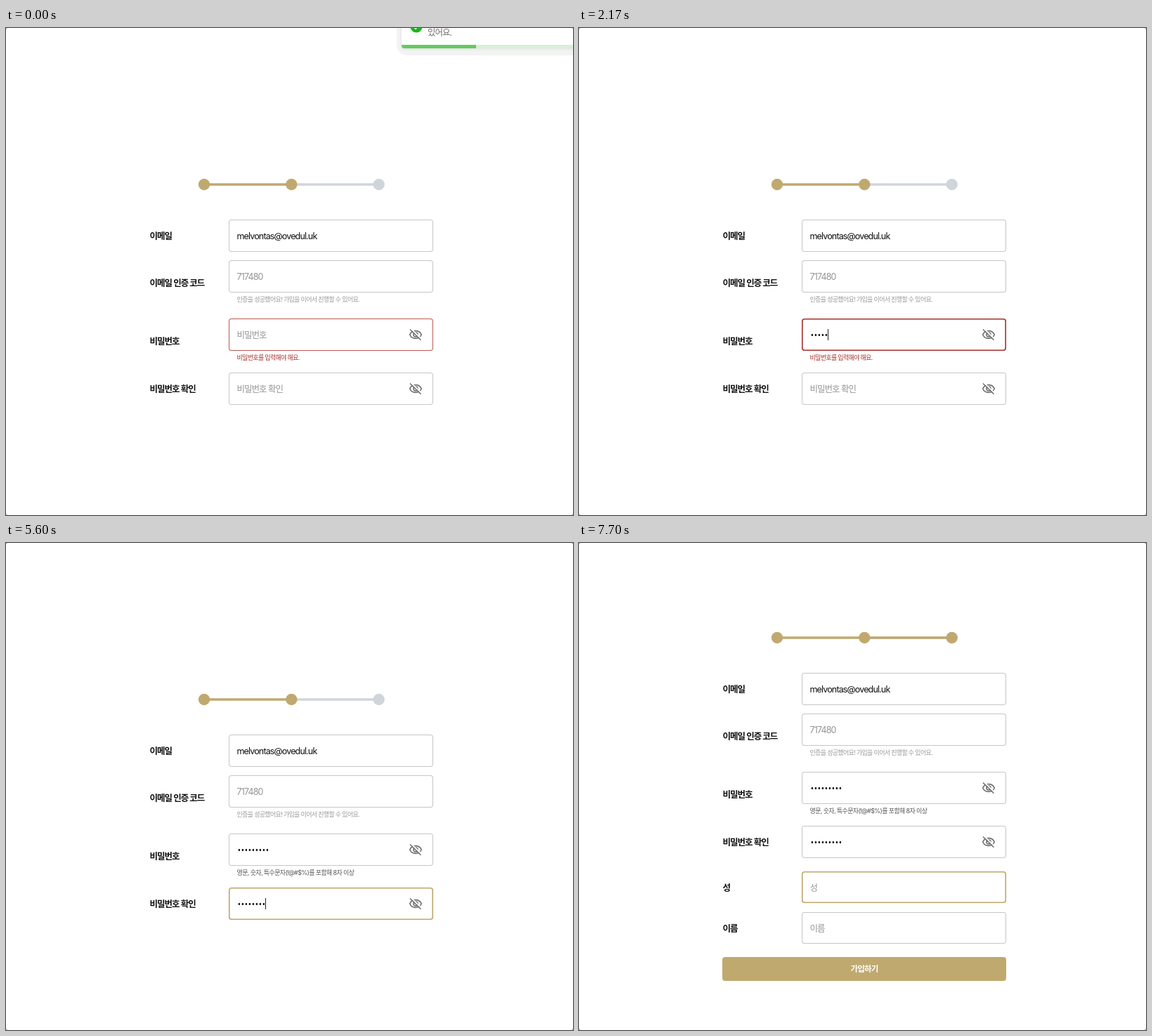
Recreate the animation shown at these times as an HTML page. Size 807x694 px, loop 8 s.

```html
<!DOCTYPE html>
<html lang="ko">
<head>
<meta charset="utf-8">
<title>Sign-up form</title>
<style>
:root {
  --gold: #c0a96f;
  --grey: #c6c6c6;
  --red: #a5302c;
}
html, body { margin: 0; width: 100%; height: 100%; overflow: hidden; background: #999; }
body {
  font: 12.5px/20px Inter, "Noto Sans CJK KR", "Noto Sans CJK JP", sans-serif;
  letter-spacing: -1px;
  white-space: nowrap;
  color: #111;
}
#stage { position: absolute; width: 807px; height: 694px; overflow: hidden; background: #fff; border-radius: 3px; }
#stage div, #stage svg, #stage span, #stage b { position: absolute; }

/* The loop lasts 8 s, so 1% is 80 ms. */
.cut { animation: 8s step-end infinite; }

/* Form */
#form { inset: 0; animation-name: lift; }
@keyframes lift { 0% { transform: none } 77.85%, 100% { transform: translateY(-88px) } }

#steps { left: 0; top: 203px; }
.late { animation-name: late; }
@keyframes late { 0% { opacity: 0 } 77.85%, 100% { opacity: 1 } }

.row { left: 0; width: 807px; height: 45.5px; }
.row b { left: 204.5px; top: 14px; font-weight: 600; }
.noted b { top: 23px; }
.field {
  left: 317px; width: 291px; height: 45.5px;
  border-radius: 4px;
  box-shadow: inset 0 0 0 1px var(--grey);
}
.field span { left: 11.5px; top: 14px; }
.field .latin { letter-spacing: -.85px; }
.hint { color: #949494; }
.note { left: 328.5px; top: 48.5px; font-size: 9px; line-height: 14px; letter-spacing: -.68px; color: #999; }
.eye { left: 256px; top: 13px; width: 20px; height: 20px; fill: none; stroke: #707070; stroke-width: 1.6; }

/* Password bullets, one per 5 px of width; the right border is the caret */
.typed {
  left: 11.5px; top: 15px; height: 16px; width: 0;
  border-right: 1px solid transparent;
  background: radial-gradient(circle at 2.9px 8.5px, #1a1a1a 1.1px, transparent 1.7px) 0 0 / 5px 16px padding-box;
}

#pw .field { animation-name: pwBorder; }
@keyframes pwBorder {
  0% { box-shadow: inset 0 0 0 1px #bb5753 }
  13.1% { box-shadow: inset 0 0 0 1.6px var(--red) }
  45.5%, 100% { box-shadow: inset 0 0 0 1px var(--grey) }
}
#pw .hint { animation-name: pwHint; }
@keyframes pwHint { 0% { opacity: 1 } 20.1%, 100% { opacity: 0 } }
#pw .typed { animation-name: pwType, pwCaret; }
@keyframes pwType {
  0% { width: 0 }
  20.1% { width: 5px }
  21.5% { width: 10px }
  23.6% { width: 15px }
  25.35% { width: 20px }
  27.1% { width: 25px }
  28.85% { width: 30px }
  30.6% { width: 35px }
  34.1% { width: 40px }
  39.35%, 100% { width: 45px }
}
@keyframes pwCaret {
  0% { border-color: transparent }
  13.1% { border-color: #222 }
  45.5%, 100% { border-color: transparent }
}
#pw .error { color: var(--red); animation-name: errorOut; }
@keyframes errorOut { 0% { opacity: 1 } 45.5%, 100% { opacity: 0 } }
#pw .rule { color: #555; letter-spacing: -.63px; animation-name: ruleIn; }
@keyframes ruleIn { 0% { opacity: 0 } 45.5%, 100% { opacity: 1 } }

#again .field { animation-name: againBorder; }
@keyframes againBorder {
  0% { box-shadow: inset 0 0 0 1px var(--grey) }
  45.5% { box-shadow: inset 0 0 0 1.6px var(--gold), 0 0 2px #c0a96f40 }
  77.85%, 100% { box-shadow: inset 0 0 0 1px var(--grey) }
}
#again .hint { animation-name: againHint; }
@keyframes againHint { 0% { opacity: 1 } 53.35%, 100% { opacity: 0 } }
#again .typed { animation-name: againType, againCaret; }
@keyframes againType {
  0% { width: 0 }
  53.35% { width: 5px }
  55.95% { width: 10px }
  57.7% { width: 15px }
  60.35% { width: 20px }
  62.95% { width: 25px }
  65.6% { width: 30px }
  68.2% { width: 35px }
  69.95% { width: 40px }
  76.95%, 100% { width: 45px }
}
@keyframes againCaret {
  0% { border-color: transparent }
  45.5% { border-color: #222 }
  77.85%, 100% { border-color: transparent }
}

/* Name rows glide in from the left */
#family, #given { animation: 8s cubic-bezier(.16, 1, .3, 1) infinite; }
#family { animation-name: familyIn; }
#given { animation-name: givenIn; }
@keyframes familyIn {
  0%, 77.85% { opacity: 0; transform: translateX(-60px) }
  86.6%, 100% { opacity: 1; transform: none }
}
@keyframes givenIn {
  0%, 79.7% { opacity: 0; transform: translateX(-60px) }
  87.5%, 100% { opacity: 1; transform: none }
}
#family .field { box-shadow: inset 0 0 0 1.6px var(--gold), 0 0 2px #c0a96f40; }
#given .field { animation: givenBorder 8s linear infinite; }
@keyframes givenBorder {
  0%, 79.7% { box-shadow: inset 0 0 0 1px #333 }
  82.25% { box-shadow: inset 0 0 0 1px #58585c }
  87%, 100% { box-shadow: inset 0 0 0 1px var(--grey) }
}
#family .typed { animation-name: blink; }
@keyframes blink {
  0% { border-color: #222 }
  83.1% { border-color: transparent }
  89.2% { border-color: #222 }
  96.2%, 100% { border-color: transparent }
}
#join {
  left: 204px; top: 678px; width: 404px; height: 34px;
  border-radius: 4px; background: var(--gold); color: #fff;
  font-size: 11.5px; font-weight: 600; line-height: 35px; letter-spacing: -.8px; text-align: center;
}

/* Toast */
#toast { left: 556px; top: -60px; width: 290px; height: 99px; border-radius: 15px; background: #f3f3f3; animation: leave 8s linear infinite; }
@keyframes leave {
  0%, 23.4% { transform: none }
  25.15% { transform: translateX(-20px) }
  26.2%, 100% { transform: translateX(290px) }
}
#card { left: 7px; top: 0; width: 262px; height: 88.5px; border-radius: 4px; overflow: hidden; background: #fff; }
#shade { left: 7px; top: 0; width: 262px; height: 88.5px; border-radius: 4px; box-shadow: 0 1px 4px #00000014; }
#card span { left: 37px; top: 57px; color: #707070; }
#card svg { left: 12px; top: 49px; }
#bar { left: 0; bottom: 0; width: 100%; height: 4.5px; background: #d9efd6; }
#left { left: 0; top: 0; height: 100%; background: #62cb5f; animation: drain 8s linear infinite; }
@keyframes drain { 0%, 13.1% { width: 106px } 23.4%, 100% { width: 0 } }

/* Pointer: a window over a two-shape sprite, hot spot at 10,10 */
#pointer { left: -10px; top: -10px; width: 24px; height: 32px; overflow: hidden; animation: glide 8s linear infinite, show 8s step-end infinite; }
@keyframes glide {
  0%, 6.1% { transform: translate(432px, 594px) }
  11.4%, 41.1% { transform: translate(420px, 445px) }
  43.75% { transform: translate(424px, 578px) }
  45%, 100% { transform: translate(420px, 526px) }
}
@keyframes show {
  0% { opacity: 0 }
  6.1% { opacity: 1 }
  20.1% { opacity: 0 }
  41.1% { opacity: 1 }
  52.45%, 100% { opacity: 0 }
}
#sprite { left: 0; top: 0; animation-name: shape; }
@keyframes shape {
  0%, 9.75%, 41.4%, 42.9% { transform: translateX(-24px) }
  8.15%, 10.9%, 42%, 44.75%, 100% { transform: none }
}
</style>
</head>
<body>
<svg width="0" height="0" style="position:absolute">
  <symbol id="eye" viewBox="-10 -10 20 20">
    <path d="M-8.3 0C-5.2-7.2 5.2-7.2 8.3 0C5.2 7.2-5.2 7.2-8.3 0Z"/>
    <circle r="3"/>
    <path d="M-6.9-8.6L8.6 6.4" stroke="#fff" stroke-width="1.8"/>
    <path d="M-8-7.5L7.5 7.7"/>
  </symbol>
</svg>
<div id="stage">
  <div id="form" class="cut">
    <svg id="steps" width="807" height="40" stroke-width="3.5">
      <path d="M282 20H406" stroke="#c0a96f"/>
      <path d="M406 20H531" stroke="#d0d5db"/>
      <circle cx="530.7" cy="20" r="8.2" fill="#d0d5db" stroke="none"/>
      <g class="cut late">
        <path d="M406 20H531" stroke="#c0a96f"/>
        <circle cx="530.7" cy="20" r="8.2" fill="#c0a96f" stroke="none"/>
      </g>
      <circle cx="282" cy="20" r="8.2" fill="#c0a96f"/>
      <circle cx="406.3" cy="20" r="8.2" fill="#c0a96f"/>
    </svg>

    <div class="row" style="top:273px">
      <b>이메일</b>
      <div class="field"><span class="latin">melvontas@ovedul.uk</span></div>
    </div>
    <div class="row noted" style="top:331px">
      <b>이메일 인증 코드</b>
      <div class="field"><span class="hint latin">717480</span></div>
      <span class="note">인증을 성공했어요! 가입을 이어서 진행할 수 있어요.</span>
    </div>
    <div class="row noted" id="pw" style="top:414px">
      <b>비밀번호</b>
      <div class="field cut">
        <span class="hint cut">비밀번호</span>
        <div class="typed cut"></div>
        <svg class="eye"><use href="#eye"/></svg>
      </div>
      <span class="note error cut">비밀번호를 입력해야 해요.</span>
      <span class="note rule cut">영문, 숫자, 특수문자(!@#$%)를 포함해 8자 이상</span>
    </div>
    <div class="row" id="again" style="top:491px">
      <b>비밀번호 확인</b>
      <div class="field cut">
        <span class="hint cut">비밀번호 확인</span>
        <div class="typed cut"></div>
        <svg class="eye"><use href="#eye"/></svg>
      </div>
    </div>
    <div class="row" id="family" style="top:555.5px">
      <b>성</b>
      <div class="field"><span class="hint">성</span><div class="typed cut"></div></div>
    </div>
    <div class="row" id="given" style="top:613.5px">
      <b>이름</b>
      <div class="field"><span class="hint">이름</span></div>
    </div>
    <div id="join" class="cut late">가입하기</div>
  </div>

  <div id="toast">
    <div id="shade"></div>
    <div id="card">
      <svg width="18" height="18">
        <circle cx="9" cy="9" r="8.6" fill="#14b81a"/>
        <path d="M5 9.2l3 3 5-6" fill="none" stroke="#fff" stroke-width="1.8"/>
      </svg>
      <span>있어요.</span>
      <div id="bar"><div id="left"></div></div>
    </div>
  </div>

  <div id="pointer">
    <svg id="sprite" class="cut" width="48" height="32">
      <path d="M7 3q3 0 3 2v10q0 2-3 2M13 3q-3 0-3 2M10 15q0 2 3 2M8.4 12h3.2" fill="none" stroke="#222" stroke-width="1.1"/>
      <path d="M34 10v14l3.2-3 2.2 5.4 2.4-1-2.2-5.2h4.4z" fill="#111" stroke="#fff"/>
    </svg>
  </div>
</div>
</body>
</html>
```
